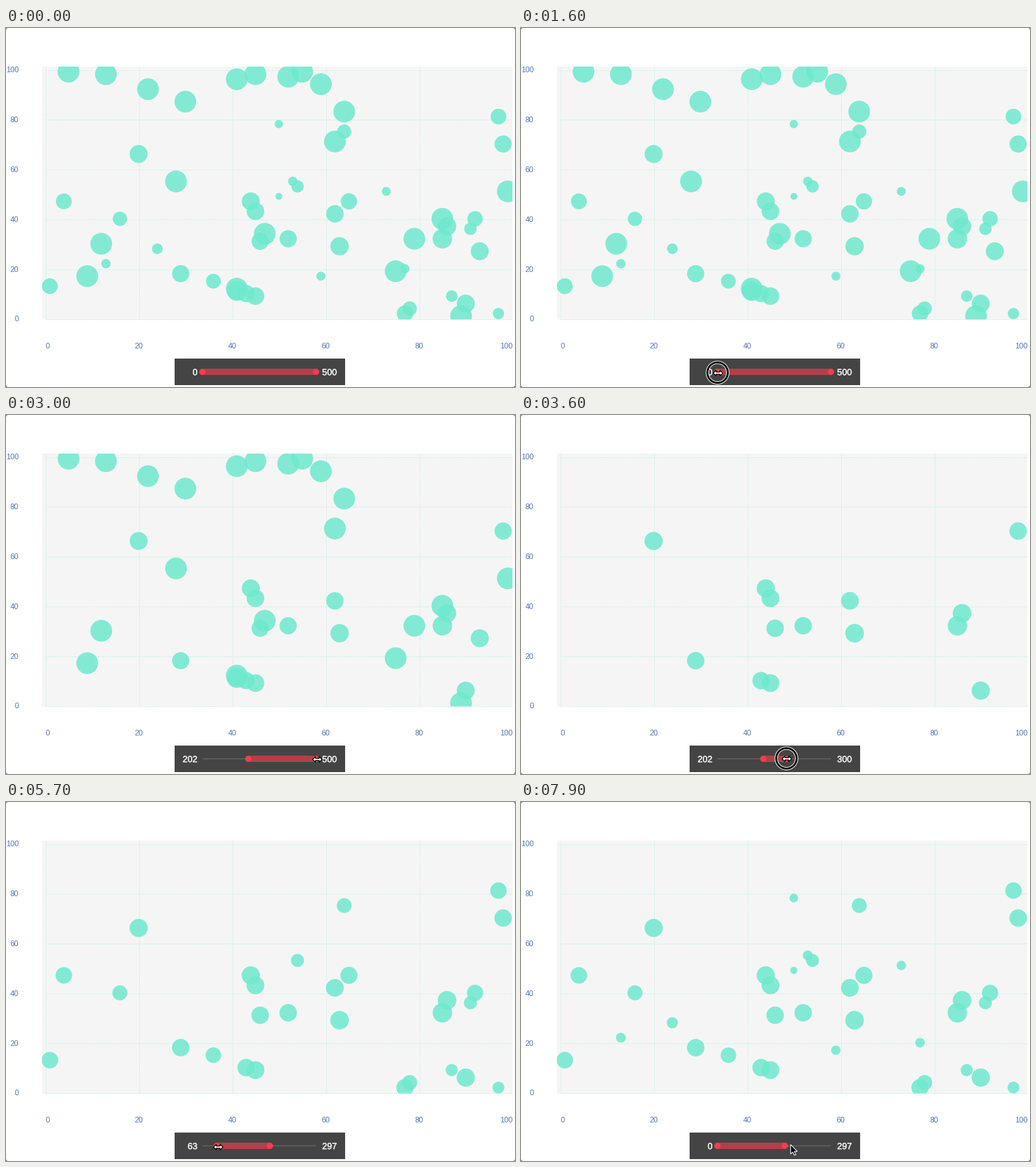
A matplotlib script for the animation above (8000 ms loop, 806 px wide and 568 px high).

```python
import numpy as np
import matplotlib.pyplot as plt
import matplotlib.patheffects as pe
from matplotlib.animation import FuncAnimation
from matplotlib.patches import Circle, Polygon, Rectangle

W, H, DPI = 806, 568, 100
FRAMES, STEP = 80, 100
PX = 72 / DPI
SANS = "Liberation Sans"

# x, y of the bubbles that reach the largest radius
LARGE = [(5, 99), (13, 98), (22, 92), (30, 87), (41, 96), (45, 98), (52, 97),
         (55, 99), (59, 94), (64, 83), (62, 71), (28, 55), (47, 34), (12, 30),
         (9, 17), (41, 12), (75, 19), (79, 32), (85, 40), (99, 51), (89, 1)]
# x, y, radius
MEDIUM = [(20, 66, 14.2), (44, 47, 14.2), (45, 43, 13.9), (46, 31, 13.6),
          (52, 32, 13.6), (62, 42, 13.8), (63, 29, 14.5), (85, 32, 15.4),
          (86, 37, 14.5), (98, 70, 13.6), (29, 18, 13.6), (43, 10, 13.6),
          (45, 9, 13.9), (90, 6, 14.2)]
SMALL = [(97, 81, 12.4), (64, 75, 11.2), (54, 53, 9.8), (65, 47, 12.9),
         (4, 47, 12.5), (16, 40, 11.3), (1, 13, 12.5), (36, 15, 11.7),
         (77, 2, 13), (78, 4, 11.4), (92, 40, 12.2), (91, 36, 9.8),
         (87, 9, 9.1), (97, 2, 8.9), (50, 78, 6.5), (50, 49, 5.4),
         (53, 55, 7.5), (73, 51, 7), (13, 22, 7.4), (24, 28, 8.4),
         (59, 17, 7.1), (77, 20, 7.2)]
HIGH = [(93, 27, 14.2), (41, 11, 15.5)]

# (time in ms, value)
LOW_KEYS = [(1700, 0), (2500, 202), (4900, 202), (5500, 63), (5900, 63), (6300, 0)]
TOP_KEYS = [(3100, 500), (3600, 300), (3700, 297)]
X_KEYS = [(700, 430), (1300, 312), (1700, 312), (2500, 386), (2900, 493),
          (3100, 493), (3600, 421), (3700, 420), (3900, 420), (4500, 386),
          (4900, 386), (5500, 336), (5900, 336), (6300, 312), (6600, 312),
          (7300, 427)]
Y_KEYS = [(700, 580), (1300, 546), (2500, 546), (2900, 545), (3600, 544),
          (3900, 544), (4500, 546), (6600, 546), (7300, 542)]
PRESSES = [(1500, 2600), (3050, 3900), (4800, 5600), (5850, 6500)]


def track(t, keys):
    """Eased value between keyframes."""
    if t <= keys[0][0]:
        return keys[0][1]
    for (t0, a), (t1, b) in zip(keys, keys[1:]):
        if t <= t1:
            u = (t - t0) / (t1 - t0)
            return a + (b - a) * u * u * (3 - 2 * u)
    return keys[-1][1]


def slider_x(v):
    return 311 + 0.36 * v


fig = plt.figure(figsize=(W / DPI, H / DPI), dpi=DPI, facecolor="white")
ax = fig.add_axes([0, 0, 1, 1])
ax.set(xlim=(0, W), ylim=(H, 0))
ax.axis("off")


def rect(x, y, w, h, color, z):
    return ax.add_patch(Rectangle((x, y), w, h, fc=color, ec="none", zorder=z))


def label(x, y, s, size, color, ha, z=1):
    return ax.text(x, y, s, fontsize=size * PX, color=color, ha=ha,
                   va="baseline", family=SANS, zorder=z)


def circle(r, z, **style):
    return ax.add_patch(Circle((0, 0), r, zorder=z, **style))


# chart
rect(57, 61, 745, 400, "#f5f5f5", 0)
grid = dict(color="#cdf2ea", lw=PX, ls=(0, (2.5, 0.8)), zorder=0.5)
for k in range(6):
    y = 460.5 - 78.8 * k
    ax.plot([62, 802], [y, y], **grid)
    label(20, y + 3.8, str(20 * k), 12, "#5576b0", "right")
    x = 62.5 + 148 * k
    if k < 5:
        ax.plot([x, x], [61, 461], **grid)
    label(66 if k == 0 else min(x, 792.5), 507.3, str(20 * k), 12, "#5576b0", "center")
for cx, sx in ((0, 1), (W, -1)):
    for cy, sy in ((0, 1), (H, -1)):
        ax.add_patch(Polygon([(cx, cy), (cx + 2.5 * sx, cy), (cx, cy + 2.5 * sy)],
                             fc="#888888", ec="none"))

# bubbles
clip = Rectangle((57, 61), 745, 399.5, transform=ax.transData)
bubbles = []


def add_bubble(x, y, r, value):
    dot = ax.add_patch(Circle((62 + 7.4 * x, 459.7 - 3.945 * y), r, fc="#6ee9cd",
                              ec="none", alpha=0.85, zorder=2))
    dot.set_clip_path(clip)
    bubbles.append((dot, r, value))


rng = np.random.default_rng(4)
for x, y, r in SMALL + MEDIUM:
    add_bubble(x, y, r, max(1, (r * r - 30) / 0.72))
for x, y, r in HIGH:
    add_bubble(x, y, r, 320)
for x, y in LARGE:
    add_bubble(x, y, 17.2, rng.uniform(310, 495))

# slider
rect(267, 523, 270, 42, "#444444", 3)
rect(311, 543.2, 180, 1.6, "#5c5c5c", 4)
span = rect(311, 539, 180, 10, "#b33f4a", 5)
knobs = [circle(5, 6, fc="#f63c50", ec="none") for _ in range(2)]
low_text = label(303.2, 549.2, "", 14, "#ececec", "right", 4)
top_text = label(500.6, 549.2, "", 14, "#ececec", "left", 4)
for txt in (low_text, top_text):
    txt.set_path_effects([pe.withStroke(linewidth=0.35, foreground="#ececec")])

# pointer
RESIZE = np.array([(-7.5, 0), (-3, -4.5), (-3, -1.6), (3, -1.6), (3, -4.5),
                   (7.5, 0), (3, 4.5), (3, 1.6), (-3, 1.6), (-3, 4.5)])
ARROW = np.array([(0, 0), (0, 15), (3.4, 11.8), (5.8, 17), (8.2, 16),
                  (5.9, 10.9), (10.5, 10.9)])
resize = ax.add_patch(Polygon(RESIZE, fc="white", ec="black", lw=1.3 * PX, zorder=9))
arrow = ax.add_patch(Polygon(ARROW, fc="black", ec="white", lw=1.1 * PX, zorder=9))
rings = [circle(16.2, 8, fc="none", ec="white", lw=5 * PX),
         circle(16.2, 8.1, fc="none", ec="black", lw=3 * PX)]


def draw(i):
    t = i * STEP
    low, top = track(t, LOW_KEYS), track(t, TOP_KEYS)
    xs = slider_x(low), slider_x(top)
    span.set_x(xs[0])
    span.set_width(xs[1] - xs[0])
    for knob, x in zip(knobs, xs):
        knob.center = x, 544
    low_text.set_text(f"{low:.0f}")
    top_text.set_text(f"{top:.0f}")

    narrowed = (500 - top) / 203
    for dot, r, value in bubbles:
        dot.set_visible(low <= value <= top)
        gain = 0.05 if value < 202 else 0.015
        dot.set_radius(r * (1 + gain * narrowed) if r < 15 else r)

    cx, cy = track(t, X_KEYS), track(t, Y_KEYS)
    pressed = any(a <= t < b for a, b in PRESSES)
    near = abs(cy - 544) < 8 and min(abs(cx - x) for x in xs) < 8
    resize.set_xy(RESIZE + (cx, cy))
    resize.set_visible(pressed or near)
    arrow.set_xy(ARROW + (cx, cy))
    arrow.set_visible(t > 700 and not (pressed or near))
    for ring in rings:
        ring.center = cx - 0.7, cy - 0.7
        ring.set_visible(pressed)
    return []


anim = FuncAnimation(fig, draw, frames=FRAMES, interval=STEP, repeat=True,
                     repeat_delay=0, init_func=lambda: draw(0))
plt.show()
```
